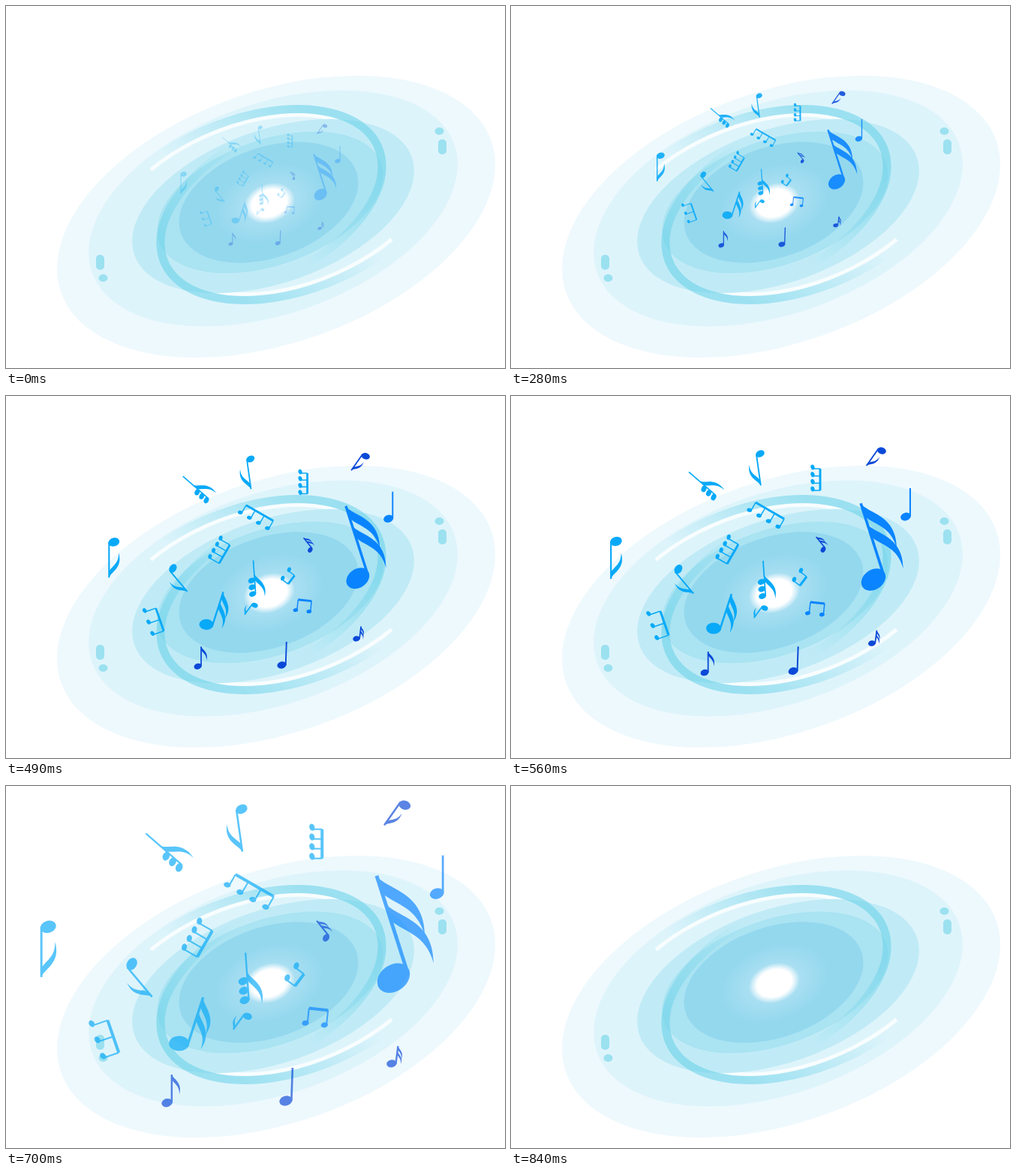
Animation, 665 px wide and 483 px high, one loop 910 ms. Source, as an HTML page with a canvas:

```html
<!DOCTYPE html>
<html lang="en">
<head>
<meta charset="utf-8">
<title>Music swirl</title>
<style>
  html, body { margin: 0; width: 100%; height: 100%; overflow: hidden; background: #fff; }
  canvas { position: absolute; left: 0; top: 0; }
</style>
</head>
<body>
<canvas id="disc" width="665" height="483"></canvas>
<canvas id="notes" width="665" height="483"></canvas>
<script>
const layer = document.getElementById('notes');
const back = document.getElementById('disc').getContext('2d');
const ctx = layer.getContext('2d');
const TURN = Math.PI * 2, DEG = Math.PI / 180;
const TILT = -19.5 * DEG;
const STEP = 70, STEPS = 13;

// Backdrop

function disc(x, y, rx, ry, fill) {
  back.fillStyle = fill;
  back.beginPath();
  back.ellipse(x, y, rx, ry, TILT, 0, TURN);
  back.fill();
}

function glow(x, y, rx, ry, color, core) {
  back.save();
  back.translate(x, y);
  back.rotate(TILT);
  back.scale(rx, ry);
  const g = back.createRadialGradient(0, 0, core, 0, 0, 1);
  g.addColorStop(0, `rgb(${color})`);
  g.addColorStop(1, `rgba(${color},0)`);
  back.fillStyle = g;
  back.beginPath();
  back.arc(0, 0, 1, 0, TURN);
  back.fill();
  back.restore();
}

// Both arms are the same curve, half a turn apart.
function twice(draw) {
  draw();
  back.save();
  back.translate(707, 530);
  back.rotate(Math.PI);
  draw();
  back.restore();
}

function armCurve(inset, from, to, width, stroke) {
  back.lineWidth = width;
  back.strokeStyle = stroke;
  back.beginPath();
  back.ellipse(313.5, 265, 198 - inset, 110.6 - inset, -22.7 * DEG, from, to);
  back.stroke();
}

function shine() {
  armCurve(8, 4.2, 6, 5, 'rgba(255,255,255,.8)');
}

function arm() {
  const fade = back.createLinearGradient(490, 210, 390, 340);
  fade.addColorStop(0, 'rgba(100,208,232,.55)');
  fade.addColorStop(1, 'rgba(100,208,232,0)');
  armCurve(0, 3.28, 7.7, 11, fade);
  back.fillStyle = '#9be1f0';
  back.beginPath();
  back.roundRect(120, 332, 11, 20, 5);
  back.ellipse(129.5, 363, 6, 5, 0, 0, TURN);
  back.fill();
}

function drawBackdrop() {
  disc(360, 281, 304, 168, '#eef9fd');
  disc(356, 270, 256, 140.5, '#def4fb');
  twice(shine);
  disc(356, 267, 196, 102, '#c0ebf6');
  disc(352, 262, 157, 83.5, '#aae3f2');
  disc(350, 262, 124, 73.5, '#94d8ee');
  twice(arm);
  glow(351, 263, 75, 50, '180,226,244', .2);
  glow(351, 263, 35, 26, '255,255,255', .68);
}

// Notes, laid out at scale 1

const SKY = '#08a9f8', BLUE = '#0a84ff', NAVY = '#0b49d8';

function head(x, y, r) {
  ctx.beginPath();
  ctx.ellipse(x, y, r, r * .75, -.3, 0, TURN);
  ctx.fill();
}

function line(x1, y1, x2, y2, width) {
  ctx.lineWidth = width;
  ctx.beginPath();
  ctx.moveTo(x1, y1);
  ctx.lineTo(x2, y2);
  ctx.stroke();
}

function place(color, x, y, angle, draw) {
  ctx.save();
  ctx.translate(x, y);
  ctx.rotate(angle * DEG);
  ctx.fillStyle = ctx.strokeStyle = color;
  draw();
  ctx.restore();
}

// Hangs from the stem's tip at the origin; size is the stem length.
function flag(size, side) {
  const w = size * side;
  ctx.beginPath();
  ctx.moveTo(0, 0);
  ctx.bezierCurveTo(w * .05, size * .16, w * .4, size * .28, w * .27, size * .7);
  ctx.bezierCurveTo(w * .28, size * .4, w * .1, size * .34, 0, size * .18);
  ctx.fill();
}

// The stem rises from the head at the origin; extra heads stack along it.
function note(color, x, y, r, stem, angle, { flags = 1, side = 1, stack = 1 } = {}) {
  place(color, x, y, angle, () => {
    const edge = r * .85;
    for (let i = 0; i < stack; i++) head(0, -i * r * 1.9, r);
    line(edge, 0, edge, -stem, 1 + r * .15);
    ctx.translate(edge, -stem * (stack > 1 ? .6 : 1));
    for (let i = 0; i < flags; i++) {
      flag(stem, side);
      ctx.translate(0, stem * .28);
    }
  });
}

// The bar runs along x; stems leave it at even distances.
function beamed(color, x, y, length, stem, angle, count) {
  place(color, x, y, angle, () => {
    line(0, 0, length, 0, 3);
    for (let i = 0; i < count; i++) {
      const at = length * i / (count - 1);
      line(at, 0, at, stem, 1.5);
      head(at - 2, stem, 3.5);
    }
  });
}

function drawNotes() {
  note(SKY, 140, 194, 8, 50, 180, { side: -1 });
  note(SKY, 270, 135, 4.5, 47, -49, { stack: 3 });
  note(SKY, 332, 77, 6, 42, 172);
  note(NAVY, 494, 73, 6, 28, -145, { side: -1 });
  note(BLUE, 526, 161, 7, 38, 0, { flags: 0 });
  note(BLUE, 483, 245, 17.5, 102, -17.7, { flags: 2 });
  note(SKY, 223, 231, 6.5, 38, 140);
  note(SKY, 270, 310, 10, 51, 18, { flags: 2 });
  note(NAVY, 258, 369, 5.5, 28, 0);
  note(NAVY, 376, 367, 6.5, 33, 2, { flags: 0 });
  note(NAVY, 481, 330, 5, 18, 7, { flags: 2 });
  note(NAVY, 416, 205, 4, 19, -39, { flags: 2 });
  note(SKY, 335, 267, 5, 47, -4, { stack: 3 });
  note(SKY, 338, 283, 4.5, 19, -144);

  beamed(SKY, 412, 97, 29, 10, 90, 4);
  beamed(SKY, 326, 142, 44, 13, 30, 4);
  beamed(SKY, 303, 198, 30, 16, 120, 4);
  beamed(SKY, 199, 287, 34, 16, 71, 3);
  beamed(SKY, 394, 241, 15, 11, 127, 2);
  beamed(BLUE, 399, 275, 19, 15, 6, 2);
}

// Time: a slow start, a burst, then a second burst that fades away.

const clamp = v => Math.min(1, Math.max(0, v));
const easeOut = (k, power) => 1 - (1 - k) ** power;

function pose(step) {
  const start = clamp(step / 4), burst = clamp((step - 4) / 4), leave = clamp((step - 8) / 4);
  const scale = .532 + .152 * start + .316 * easeOut(burst, 1.3) + .5 * easeOut(leave, 1.66);
  return {
    scale,
    x: 385 * (1 - scale) - 18 * clamp((8 - step) / 2),
    y: 212 * (1 - scale) + 22 * (1 - start),
    opacity: leave ? 1 - leave ** 1.6 : 1 - .7 * (1 - step / 8) ** 2.6
  };
}

let shown = -1;
function frame() {
  const step = Math.floor(performance.now() / STEP) % STEPS;
  if (step !== shown) {
    shown = step;
    const { scale, x, y, opacity } = pose(step);
    ctx.setTransform(1, 0, 0, 1, 0, 0);
    ctx.clearRect(0, 0, 665, 483);
    ctx.setTransform(scale, 0, 0, scale, x, y);
    drawNotes();
    layer.style.opacity = opacity;
  }
  requestAnimationFrame(frame);
}

drawBackdrop();
frame();
</script>
</body>
</html>
```
